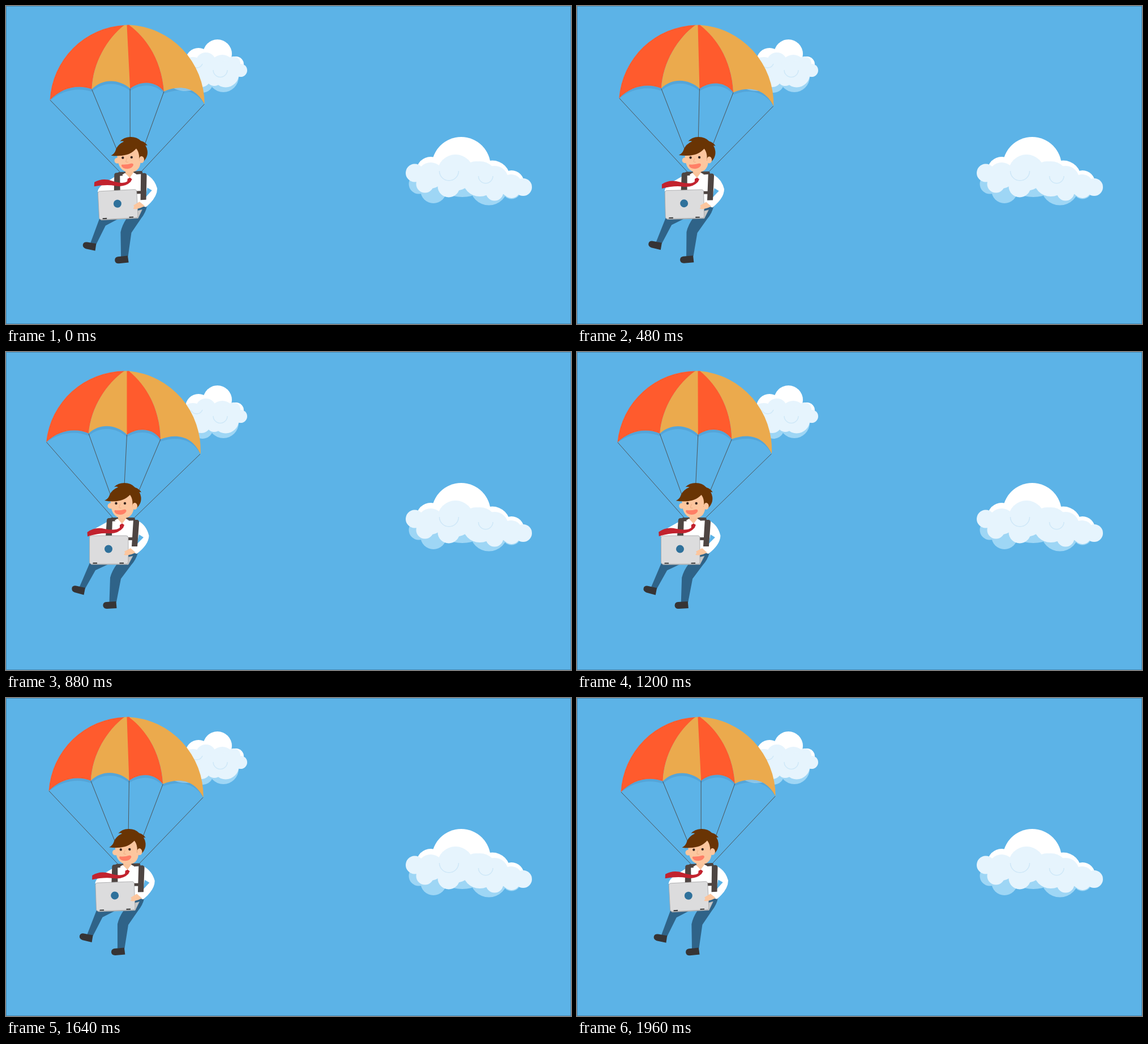
Write an HTML page that moves like this. It is 998 px wide and 561 px high and loops after 2 s.

```html
<!DOCTYPE html>
<html lang="en">
<head>
<meta charset="utf-8">
<title>Parachute</title>
<style>
  html, body { margin: 0; width: 100%; height: 100%; overflow: hidden; background: #5cb3e7; }
  svg { display: block; width: 998px; height: 561px; }
</style>
</head>
<body>
<svg viewBox="0 0 998 561">
  <rect width="998" height="561" fill="#5cb3e7"/>

  <g id="small-cloud">
    <g fill="#9ed6f5">
      <circle cx="384" cy="125" r="27"/><circle cx="347" cy="134" r="19"/><ellipse cx="318" cy="138" rx="27" ry="12"/>
    </g>
    <g fill="#fff">
      <circle cx="373.500" cy="84.500" r="25.500"/><circle cx="340" cy="97" r="23"/><circle cx="406" cy="103" r="14"/>
    </g>
    <g fill="#e6f4fd">
      <circle cx="353" cy="100" r="18"/><circle cx="382" cy="108" r="22"/><circle cx="402" cy="101" r="12"/>
      <circle cx="330" cy="115" r="25"/><circle cx="388" cy="120" r="23.500"/><circle cx="414.500" cy="113.500" r="11.500"/>
      <circle cx="368" cy="127" r="14"/><circle cx="345" cy="126" r="17"/>
    </g>
    <path d="M366 113a12.500 12.500 0 0 0 25 0M327 103a11 11 0 0 0 20 -1" fill="none" stroke="#cfe8f8" stroke-width="1.500"/>
  </g>

  <g id="large-cloud">
    <g fill="#9ed6f5">
      <circle cx="729" cy="314" r="17.500"/><circle cx="755" cy="325" r="23"/><ellipse cx="806" cy="314" rx="40" ry="23"/>
      <circle cx="853" cy="318" r="33.500"/><circle cx="893" cy="324" r="16.500"/>
    </g>
    <g fill="#fff">
      <path d="M752 283a52 52 0 0 1 104 0v20h-104z"/><circle cx="750" cy="291" r="25"/>
      <circle cx="859" cy="304" r="31.500"/><circle cx="893" cy="312" r="22"/>
    </g>
    <g fill="#e6f4fd">
      <circle cx="722" cy="294.500" r="16"/><circle cx="750" cy="299" r="23"/><circle cx="794" cy="294" r="32"/>
      <circle cx="830" cy="299" r="25"/><circle cx="863" cy="306" r="24"/><circle cx="892" cy="317" r="20"/>
      <circle cx="913.500" cy="319.500" r="15.500"/><circle cx="740" cy="314" r="15.500"/>
      <circle cx="782" cy="318" r="19.500"/><circle cx="837" cy="305" r="31"/><circle cx="863" cy="328" r="15.500"/>
      <circle cx="893" cy="324" r="15"/><rect x="750" y="295" width="130" height="23"/>
    </g>
    <path d="M765.500 291a17 17 0 0 0 34 0M834.500 300a12.700 12.700 0 0 0 25.500 0" fill="none" stroke="#cfe8f8" stroke-width="1.500"/>
  </g>

  <g id="glider">
    <g id="cords" fill="none" stroke="#4b4b4b" stroke-width=".9">
      <path d="M71.500 159L190 294M146 144L186 256M213.500 146L209 236M273 154L230 256M343 180L224 295"/>
    </g>

    <path id="shade" fill="#2f5f8e" fill-opacity=".16"
      d="M72 159C93 143 122 138 146 148C166 130 195 133 213.500 150C231 139 257 137 273 158C298 149 328 151 343 180L330 120H90Z"/>
    <g id="canopy">
      <path fill="#ff5b2d" d="M71 159A140 140 0 0 1 210 33.500C178 55 150 97 146 143.500C122 133 93 138 71 159Z"/>
      <path fill="#ebaa4d" d="M209 33.500H214V146C195 127.500 166 125 146 143.500C150 97 178 55 209 33.500Z"/>
      <path fill="#ff5b2d" d="M213.500 33.500H218C252 62 272 105 273 154C257 132 231 134 213.500 146Z"/>
      <path fill="#ebaa4d" d="M217 33.500A140 140 0 0 1 343.500 180C328 146 298 144 273 154C272 105 252 62 217 33.500Z"/>
    </g>

    <g id="legs">
      <path fill="#2f6388" d="M148 372H186L158 385L140 417L130 414Z"/>
      <path fill="#2f6388" d="M196 374L215 353L233 354Q230 366 221 376L203 400L195 441L182.500 441L184 398Q187 386 196 374Z"/>
      <path fill="#363435" d="M140 416L137.500 428.500L121 424Q115 421 116.500 416Q118 411.500 124 412.500Z"/>
      <path fill="#363435" d="M194.500 440L195.500 452L178 453Q171.500 452.500 171.300 447Q171.500 441.500 177 441Z"/>
    </g>

    <g id="body">
      <rect x="184" y="292" width="44" height="9" rx="3" fill="#4e4542"/>
      <path fill="#fff" d="M180 299L232 297Q248 305 252.500 324Q252 340 231 356L216 351L230 339L225 354H180V325H147Q148 317 160 310Z"/>
      <path fill="#5cb3e7" d="M235 322L243 327L231 339Z"/>
      <path fill="#f9c39a" d="M198 286H212V295L205 304L198 296Z"/>
      <path fill="#fff" d="M197 294L205 303L200 307L192 297ZM212 294L205 303L212 307L217 297Z"/>
      <path fill="#4e4542" d="M178 296Q179 293 182 293H188L187 326H176ZM225 296H232Q236 297 235 302L232 343H222ZM210 327H226L225 332H210Z"/>
      <path id="tie" fill="#c2222e" d="M201 305L205 302.500L209 305L207 310Q198 321 181 320Q165 319 144 325.500L143.500 318Q157 308 174 312Q194 316 201 310Z"/>
    </g>

    <g id="laptop">
      <path fill="#c9c9c9" stroke="#aaa" stroke-width=".6" d="M215 362L224 360L216 375H151L148 372Z"/>
      <rect x="147.500" y="324" width="68.500" height="50" rx="4" fill="#dcdcdd" stroke="#a3a3a5" stroke-width=".8"/>
      <path d="M153.500 372.500H161M200.500 372.500H208" stroke="#333" stroke-width="1.800"/>
      <circle cx="181" cy="347.500" r="7" fill="#2f719b"/>
      <path fill="#fcc69e" d="M209 352L220 346L229 354Q223 357 215 358.500Q209 359 208 357Q212 355 209 352Z"/>
    </g>

    <g id="head">
      <circle cx="184.500" cy="271.500" r="5" fill="#fcc69e"/>
      <path fill="#fcc69e" d="M184 258Q194 244 213 246Q227 252 226 272Q225 293 207 293.500Q190 293 186 276Z"/>
      <path fill="#693404" d="M174 262Q181 259 183 252Q187 243 198 238.500Q195 237 191 238Q198 231 209 231Q221 231 228 239Q235 241 239 247.500L235.500 247Q240 255 238 264Q236 271 230 276L223 273Q225 260 219 252Q211 260 202 262Q188 265 174 262Z"/>
      <ellipse cx="227.500" cy="272" rx="4.500" ry="6" fill="#fcc69e"/>
      <circle cx="194.500" cy="267" r="2.200" fill="#3a2822"/>
      <circle cx="210" cy="267" r="2.200" fill="#3a2822"/>
      <path d="M202 268L199.500 274Q201 276 203.500 275" fill="none" stroke="#eeae85" stroke-width="1"/>
      <path fill="#ff7f66" d="M192.500 279Q202 280 209 277.800Q213 277.500 212.500 281Q210 286.500 202 287Q193 286.500 191.500 281.500Q191 279 192.500 279Z"/>
    </g>
  </g>

  <rect x=".5" y=".5" width="997" height="560" fill="none" stroke="#4589b3"/>
</svg>
<script>
  const LOOP = 2000, STEP = 40;
  const SWING = 3, FLAP = -10, DRAWN_AT = 0.965;
  const glider = document.getElementById('glider');
  const tie = document.getElementById('tie');

  const rotate = (part, angle, x, y) => part.setAttribute('transform', `rotate(${angle} ${x} ${y})`);

  // The glider swings about the canopy top while the tie flaps about its knot.
  function render(time) {
    const t = Math.floor((time % LOOP) / STEP) * STEP;
    const swing = (1 - Math.cos(2 * Math.PI * t / LOOP)) / 2 - DRAWN_AT;
    rotate(glider, SWING * swing, 214, 34);
    rotate(tie, FLAP * swing, 205, 305);
  }

  const start = performance.now();
  function tick() {
    render(performance.now() - start);
    requestAnimationFrame(tick);
  }
  tick();
</script>
</body>
</html>
```
